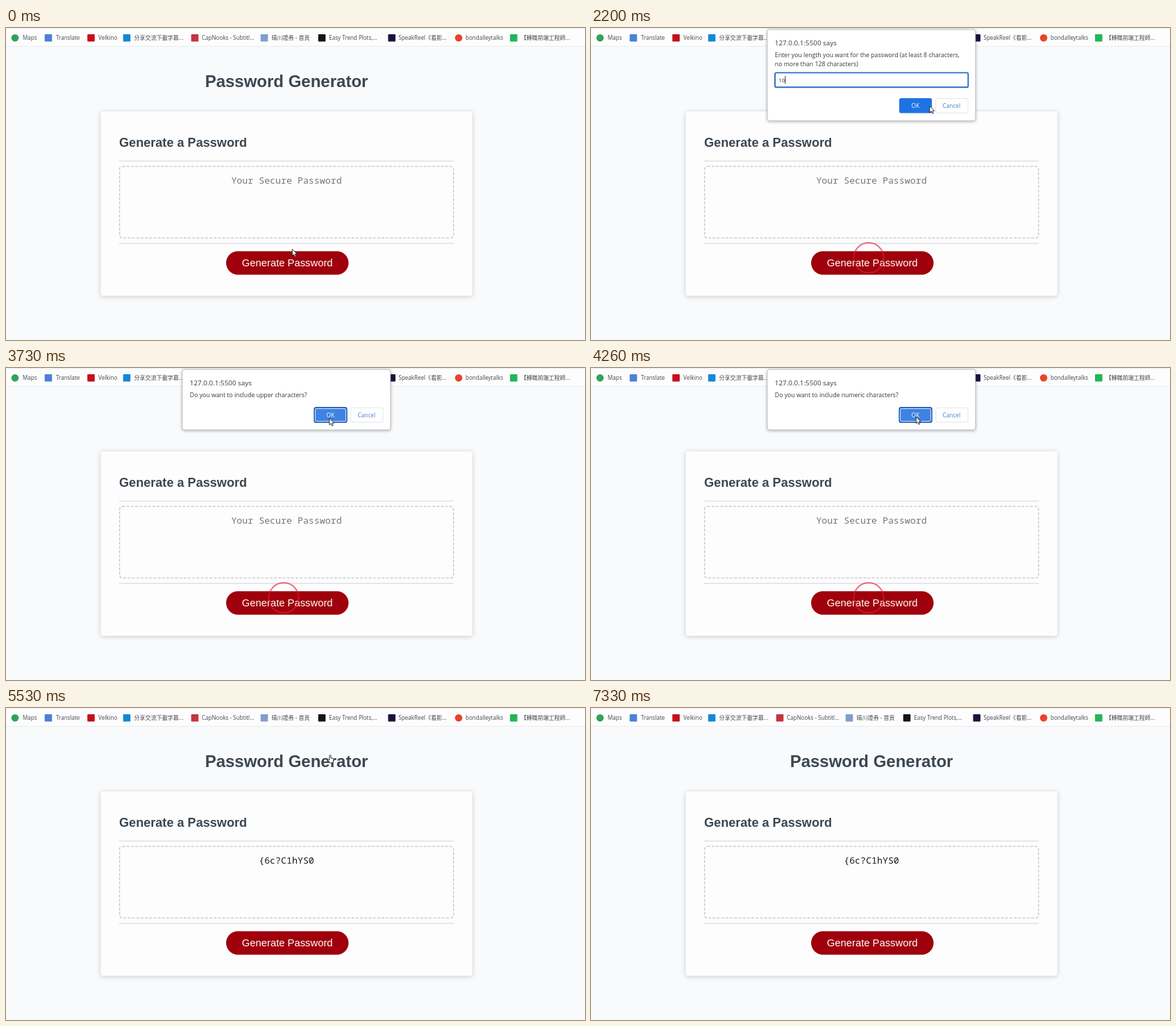
An HTML page for the animation above (7400 ms loop, 834 by 449 pixels).

```html
<!DOCTYPE html>
<html lang="en">
<head>
<meta charset="utf-8">
<title>Password Generator</title>
<style>
  html, body { margin: 0; width: 100%; height: 100%; overflow: hidden; background: #f8fafc; }
  svg { display: block; width: 834px; height: 449px; }
  text { white-space: pre; }
  .ui { font-family: "Open Sans", "Noto Sans CJK TC", "Noto Sans CJK", sans-serif; fill: #35383c; }
  .bookmark { font-size: 8.05px; fill: #45484c; }
  .page { font-family: "Liberation Sans", Arial, sans-serif; font-weight: 700; fill: #3b4650; }
  .mono { font-family: "Noto Sans Mono", monospace; font-size: 13.28px; text-anchor: middle; }
  .message { font-size: 8.72px; }
  .label { font-size: 8.3px; text-anchor: middle; }
  .card { fill: #fdfdfe; filter: drop-shadow(0 1px 3px rgba(0, 0, 0, .2)); }
  .panel { fill: #fff; stroke: #b9bbbe; stroke-width: .8; filter: drop-shadow(0 1px 2px rgba(0, 0, 0, .3)); }
  .cursor path { fill: #fff; stroke: #222; stroke-width: .9; stroke-linejoin: round; }
</style>
</head>
<body>
<svg viewBox="0 0 834 449">
  <rect width="834" height="449" fill="#f8fafc"/>
  <rect width="834" height="26" fill="#fdfdfe"/>
  <rect width="834" height="1.2" fill="#eceef1"/>
  <rect y="25.8" width="834" height="1" fill="#e9ebee"/>
  <g id="bookmarks"></g>

  <text class="page" x="404" y="84.5" font-size="24" text-anchor="middle">Password Generator</text>
  <rect class="card" x="136.3" y="120" width="535.5" height="265.5" rx="4"/>
  <text class="page" x="163" y="171" font-size="18.1">Generate a Password</text>
  <path d="M163 191.4H645M163 310H645" stroke="#dfe0e3" stroke-width="1.5"/>
  <rect x="163.6" y="199.2" width="481" height="103" rx="4" fill="none" stroke="#c4c5c7" stroke-width="1.3" stroke-dasharray="4 2.2"/>
  <text id="field" class="mono" x="404" y="224"></text>
  <rect x="317" y="321.2" width="176.5" height="33.8" rx="16.9" fill="#9f000c"/>
  <text x="405.2" y="343.2" font-family="'Liberation Sans', Arial, sans-serif" font-size="14.8" fill="#fff" text-anchor="middle">Generate Password</text>
  <circle id="ring" cx="400" cy="330.7" fill="none" stroke="#e02034" stroke-width="2"/>

  <g id="dialog">
    <rect id="panel" class="panel" x="254" y="2.2" width="299.8" rx="3"/>
    <text class="ui" x="264.8" y="24.6" font-size="9.85">127.0.0.1:5500 says</text>
    <text id="line1" class="ui message" x="264.8" y="42.3"></text>
    <g id="prompt">
      <text class="ui message" x="264.8" y="55.3">no more than 128 characters)</text>
      <rect x="265" y="64.4" width="278.3" height="20.8" rx="2" fill="#fff" stroke="#2b6cc8" stroke-width="1.9"/>
      <text id="typed" class="ui" x="270.3" y="78.2" font-size="8"></text>
      <rect id="caret" y="69" width=".9" height="11.5" fill="#222"/>
    </g>
    <g id="buttons">
      <rect x="444" y="101" width="47" height="21.6" rx="2.5" fill="#1f72e2"/>
      <g id="focus" fill="none">
        <rect x="444.2" y="101.2" width="46.6" height="21.2" rx="2.5" fill="#3f82e2" stroke="#2560b4" stroke-width="1.8"/>
        <rect x="445.6" y="102.6" width="43.8" height="18.4" rx="1.5" stroke="#dce8fa" stroke-width="1"/>
      </g>
      <text class="ui label" x="467.4" y="115" style="fill:#fff">OK</text>
      <rect x="496.6" y="101.4" width="46.4" height="20.8" rx="2.5" fill="#fff" stroke="#dfe2e7" stroke-width=".9"/>
      <text class="ui label" x="519.3" y="115" style="fill:#4a7fd0">Cancel</text>
    </g>
  </g>

  <g id="cursor" class="cursor">
    <path id="arrow" d="M.3 .3V9.8L2.5 7.8 4 11.2 5.7 10.5 4.2 7.2H7.2Z"/>
    <path id="hand" d="M-1 .8Q0-.6 1 .8V4.4L4 5Q5 5.4 5 6.6L4.2 9.6V11.4H-1.2V10.2L-3.6 7.2Q-3.8 5.8-2.4 6.2L-1 7.4Z"/>
  </g>
</svg>
<script>
const LOOP = 7400, STEP = LOOP / 111;
const $ = id => document.getElementById(id);
const show = (el, on) => el.setAttribute("visibility", on ? "inherit" : "hidden");
const clamp = v => Math.min(1, Math.max(0, v));
const easeOut = v => 1 - (1 - clamp(v)) ** 2;

// [icon x, icon colour, round, text x, text]
const bookmarks = [
  [13, "#34a15a", 1, 24, "Maps"],
  [61, "#4b80d8", 0, 72, "Translate"],
  [122.5, "#c4101c", 0, 133, "Velkino"],
  [174, "#1688d4", 0, 184.5, "分享交流下載字幕..."],
  [272, "#c53440", 0, 282, "CapNooks - Subtitl..."],
  [372, "#7f9fc8", 0, 382.5, "晴川證券 - 首頁"],
  [455, "#131417", 0, 465.3, "Easy Trend Plots,..."],
  [555.7, "#21103f", 0, 565.5, "SpeakReel《看影..."],
  [652, "#e8432c", 1, 662, "bondalleytalks"],
  [731.3, "#1fb757", 0, 741.5, "【轉職前端工程師..."]
];
$("bookmarks").innerHTML = bookmarks.map(([x, color, round, tx, label]) =>
  `<rect x="${x - 5.3}" y="9" width="10.6" height="10.6" rx="${round ? 5.3 : 1}" fill="${color}"/>` +
  `<text class="ui bookmark" x="${tx}" y="17.2">${label}</text>`).join("");

const ask = kind => `Do you want to include ${kind} characters?`;
const dialogs = [
  { from: 560, to: 2490, prompt: true, text: "Enter you length you want for the password (at least 8 characters," },
  { from: 2590, to: 3190, text: ask("lower") },
  { from: 3270, to: 3990, text: ask("upper") },
  { from: 4070, to: 4660, text: ask("numeric") },
  { from: 4723, to: 5230, text: ask("special") }
];
const CLICK = 470, DONE = 5250, FADE = 140;

// [time, x, y]
const path = [
  [0, 412, 318], [400, 400, 331], [600, 400, 331], [867, 416, 233],
  [1150, 436, 118], [1600, 462, 112], [2200, 487.5, 112], [2420, 474, 111],
  [2800, 467, 73], [3733, 465.5, 72], [4300, 468, 70], [4800, 472.5, 67],
  [5200, 468, 68], [5533, 467, 67.5], [6000, 458, 130], [6500, 440, 250],
  [7200, 405, 456], [LOOP, 405, 456]
];

function cursorAt(t) {
  const i = Math.max(1, path.findIndex(p => p[0] > t));
  const [t0, x0, y0] = path[i - 1], [t1, x1, y1] = path[i];
  const u = (t - t0) / (t1 - t0), k = u * u * (3 - 2 * u);
  return [x0 + (x1 - x0) * k, y0 + (y1 - y0) * k];
}

function drawDialog(t) {
  const d = dialogs.find(d => t >= d.from && t < d.to);
  show($("dialog"), d);
  if (!d) return;
  const p = Math.min(easeOut((t - d.from) / FADE), clamp((d.to - t) / 60));
  $("dialog").setAttribute("transform", `translate(0 ${-10 * (1 - p)})`);
  $("dialog").setAttribute("opacity", Math.min(1, p * 1.18));
  $("panel").setAttribute("height", d.prompt ? 131.2 : 86.8);
  $("line1").textContent = d.text;
  $("buttons").setAttribute("transform", `translate(0 ${d.prompt ? 0 : -44.2})`);
  show($("prompt"), d.prompt);
  show($("focus"), !d.prompt);
  if (!d.prompt) return;
  const keys = [600, 1550, 1750].filter(k => k <= t);
  const count = Math.max(0, keys.length - 1);
  $("typed").textContent = "10".slice(0, count);
  $("caret").setAttribute("x", 270.2 + count * 4.6);
  const last = keys.length ? keys[keys.length - 1] : t;
  show($("caret"), (t - last) % 1000 < 500);
}

function draw(t) {
  const done = t >= DONE;
  $("field").textContent = done ? "{6c?C1hYS0" : "Your Secure Password";
  $("field").setAttribute("fill", done ? "#15171a" : "#757575");

  const gone = clamp((t - DONE) / 180);
  show($("ring"), t >= CLICK && gone < 1);
  $("ring").setAttribute("r", 6 + 15.6 * easeOut((t - CLICK) / 130) + 4 * gone);
  $("ring").setAttribute("opacity", .62 * (1 - gone));

  drawDialog(t);

  const [x, y] = cursorAt(t);
  const hand = (t > 60 && t < 930 && (y > 321 || t > CLICK)) || (t > DONE && t < 5640);
  $("cursor").setAttribute("transform", `translate(${x} ${y})`);
  show($("hand"), hand);
  show($("arrow"), !hand);
}

const start = performance.now();
function tick() {
  const t = (performance.now() - start) % LOOP;
  draw(Math.floor((t + 7) / STEP) * STEP % LOOP);
  requestAnimationFrame(tick);
}
tick();
</script>
</body>
</html>
```
